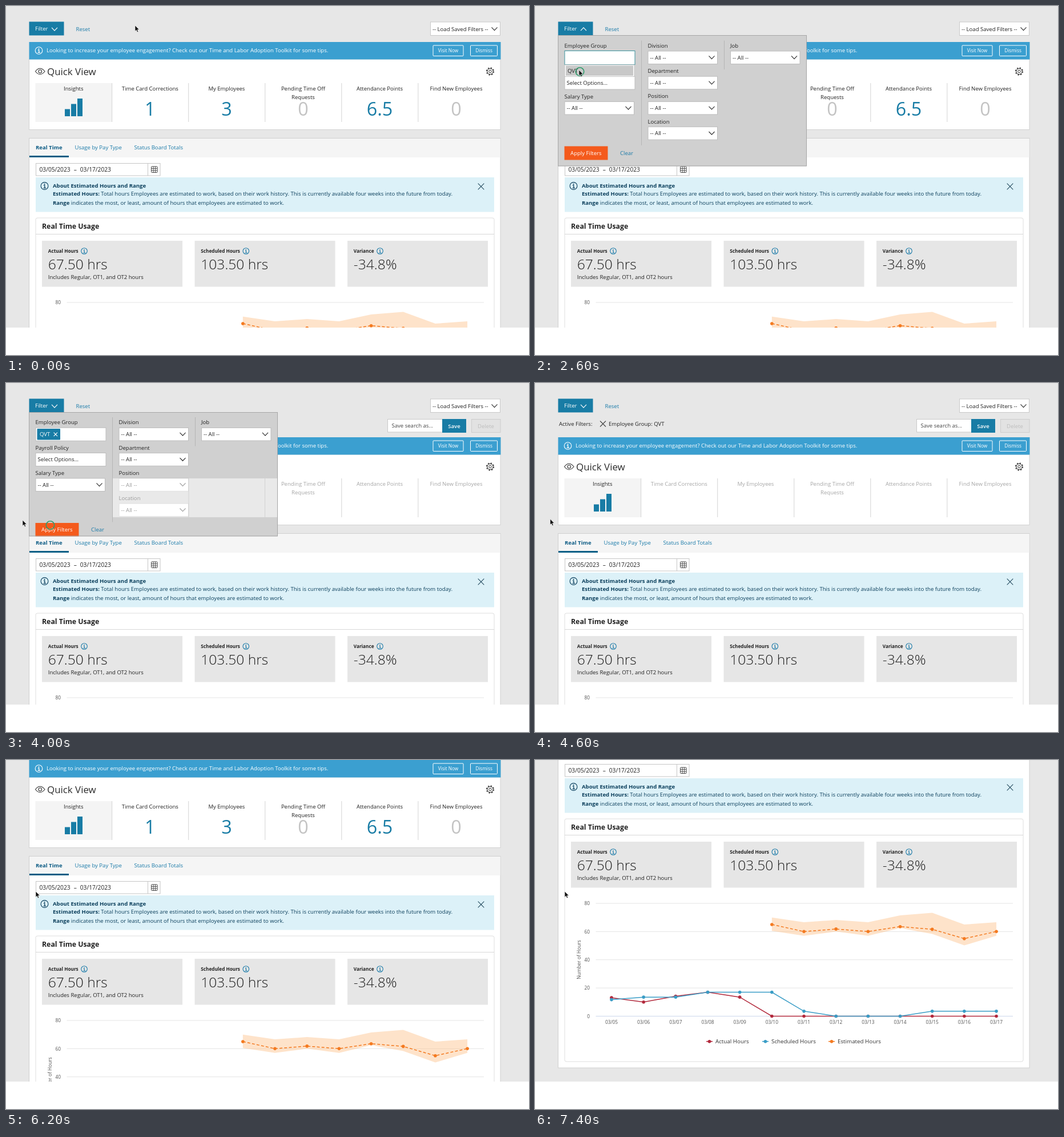
An HTML page for the animation above (7600 ms loop, 916 px wide and 611 px high).

```html
<!DOCTYPE html>
<html lang="en">
<head>
<meta charset="utf-8">
<title>Time dashboard</title>
<style>
  html, body { margin: 0; width: 100%; height: 100%; overflow: hidden; background: #fff; }
  svg { display: block; width: 100%; height: 100%; font-family: "Open Sans", sans-serif; }
  text { white-space: pre; }
</style>
</head>
<body>
<svg id="stage" viewBox="0 0 916 611"></svg>
<script>
const LOOP = 7600, STEP = 200;
const BLUE = '#187ca5', SKY = '#3b9fd0', LINK = '#1b7ba9', NAVY = '#0b3f5c', INK = '#222';
const GROUP = 'QVT';
const MID = 'text-anchor="middle"', BOLD = 'font-weight="700"', LIGHT = 'font-weight="300"';

// Drawing helpers
const rect = (x, y, w, h, fill, more = '') =>
  `<rect x="${x}" y="${y}" width="${w}" height="${h}" fill="${fill}" ${more}/>`;
const box = (x, y, w, h, fill, stroke, more = '') =>
  rect(x, y, w, h, fill, `stroke="${stroke}" ${more}`);
const text = (x, y, s, fill = INK, size = 9.55, more = '') =>
  `<text x="${x}" y="${y}" fill="${fill}" font-size="${size}" ${more}>${s}</text>`;
const path = (d, stroke, width = 1, more = '') =>
  `<path d="${d}" fill="none" stroke="${stroke}" stroke-width="${width}" ${more}/>`;
const circle = (x, y, r, fill, more = '') =>
  `<circle cx="${x}" cy="${y}" r="${r}" fill="${fill}" ${more}/>`;
const group = (body, more) => `<g ${more}>${body}</g>`;
const chevron = (x, y, color, up) => {
  const d = up ? -2.6 : 2.6;
  return path(`M${x - 5} ${y - d}l5 ${2 * d}l5 ${-2 * d}`, color, 1.2);
};
const cross = (x, y, r, color, width = 1.1) =>
  path(`M${x - r} ${y - r}l${2 * r} ${2 * r}m0 ${-2 * r}l${-2 * r} ${2 * r}`, color, width);
const info = (x, y, r, color) =>
  circle(x, y, r, 'none', `stroke="${color}" stroke-width="1.1"`) +
  circle(x, y - r * .45, r * .16, color) +
  path(`M${x - r * .25} ${y - r * .1}h${r * .3}v${r * .65}m${-r * .35} 0h${r * .7}`, color, r * .2);

// Motion helpers
const track = (keys, t, ease = u => u) => {
  const i = keys.findIndex(k => k[0] > t);
  if (i < 0) return keys.at(-1).slice(1);
  if (i === 0) return keys[0].slice(1);
  const a = keys[i - 1], b = keys[i], u = ease((t - a[0]) / (b[0] - a[0]));
  return a.slice(1).map((v, j) => v + (b[j + 1] - v) * u);
};
const swing = u => .5 - Math.cos(Math.PI * Math.min(1, Math.max(0, u))) / 2;

const POINTER = [[200, 226, 34], [800, 85, 42], [1400, 85, 42], [1800, 82, 86], [2000, 82, 86],
  [2400, 77, 112], [2700, 77, 112], [3400, 77, 246], [3800, 77, 246], [4000, 29, 240],
  [4200, 26, 238], [5000, 27, 238], [5600, 52, 230]];
const SCROLL = [[5800, 0], [6000, 18], [6200, 95], [6400, 180], [6600, 248], [6800, 278],
  [7000, 291], [7200, 298], [7400, 300]];
const CLICKS = [[1000, 1000, 85, 44], [2000, 2000, 83, 89], [2600, 2600, 78.5, 115], [3800, 4000, 77.5, 249]];

function header(t, open, applied) {
  const hover = t >= 800 && t < 1600;
  let s = rect(40.5, 27.5, 61, 24, hover ? SKY : BLUE) + text(51, 43.3, 'Filter', '#fff') +
    chevron(85, 40.5, '#fff', open) + text(122.5, 44.3, 'Reset', LINK) +
    box(743.5, 28, 122, 23.5, '#fff', '#c9c9c9') +
    text(747, 43.8, '-- Load Saved Filters --') + chevron(855.5, 40, '#333');
  if (applied) {
    s += text(42, 75.3, 'Active Filters:') + cross(119, 71.5, 5, '#444') +
      text(129, 75.3, 'Employee Group: ' + GROUP) +
      box(668.5, 63.5, 96, 22.5, '#fff', '#c9c9c9') + text(675.5, 78.3, 'Save search as...', '#444') +
      rect(764, 63, 42, 24, BLUE) + text(785, 78.5, 'Save', '#fff', 9.55, MID + ' font-weight="600"') +
      box(815.5, 63.5, 50.5, 23, '#e2e2e2', '#cdcdcd') + text(840.5, 78.5, 'Delete', '#bdbdbd', 9.55, MID);
  }
  return s;
}

function quickView(loading) {
  const tiles = [['Insights'], ['Time Card Corrections', '1'], ['My Employees', '3'],
    ['Pending Time Off', '0', 'Requests'], ['Attendance Points', '6.5'], ['Find New Employees', '0']];
  let s = box(40.5, 93, 825.5, 123.5, '#fff', '#d2d2d2') + rect(40.5, 63, 826, 30.5, SKY) +
    info(57.5, 78, 6.3, '#fff') +
    text(71, 81.3, 'Looking to increase your employee engagement? Check out our Time and Labor Adoption Toolkit for some tips.', '#fff') +
    box(748, 69, 53, 18.5, 'none', '#fff', 'rx="1"') + text(774.5, 81, 'Visit Now', '#fff', 8.25, MID) +
    box(813.5, 69, 47, 18.5, 'none', '#fff', 'rx="1"') + text(837, 81, 'Dismiss', '#fff', 8.25, MID);
  s += path('M51.5 114.5q8-10.5 16.5 0q-8.5 10.5-16.5 0z', '#333', 1.1) +
    circle(59.8, 114.5, 2.8, 'none', 'stroke="#333" stroke-width="1.1"') +
    text(72, 120.6, 'Quick View', '#2c2c2c', 16.9) +
    circle(848, 114.5, 6.2, 'none', 'stroke="#333" stroke-width="1.7" stroke-dasharray="2.43"') +
    circle(848, 114.5, 5, '#fff', 'stroke="#333"') + circle(848, 114.5, 2.2, '#fff', 'stroke="#333"') +
    rect(51.5, 135, 134.5, 68, '#f4f4f4');
  tiles.forEach(([label, value, second], i) => {
    const x = 118.3 + 134.05 * i;
    let names = text(x, 147.6, label, INK, 9.55, MID);
    if (second) names += text(x, 163, second, INK, 9.55, MID);
    s += group(names, loading && i ? 'opacity=".4"' : '');
    if (i) s += path(`M${x - 66.7} 135v68`, '#d4d4d4');
    if (value && !loading) s += text(x, 192.2, value, value === '0' ? '#c3c3c3' : BLUE, 32.3, MID);
  });
  return s + [[103, 12.5], [114, 21.5], [125, 31]].map(([x, h]) => rect(x, 193 - h, 9, h, BLUE)).join('');
}

function chart() {
  const px = i => 134 + 56.17 * i, py = v => 716.5 - 2.469 * v;
  const points = (values, from = 0) => values.map((v, i) => [px(i + from), py(v)]);
  const series = (values, color, from = 0, dash = '') => {
    const p = points(values, from);
    return path('M' + p.join('L'), color, 1.5, dash) + p.map(([x, y]) => circle(x, y, 2.8, color)).join('');
  };
  const RED = '#b2293c', CYAN = '#3a9dc6', ORANGE = '#f47a20', DASH = 'stroke-dasharray="5 3.2"';
  let s = '';
  for (let v = 0; v <= 80; v += 20)
    s += path(`M106.5 ${py(v)}H837`, v ? '#e4e4e4' : '#ccd6eb') +
      text(96, py(v) + 3.2, v, '#555', 8.3, 'text-anchor="end"');
  for (let i = 0; i < 13; i++)
    s += text(px(i), 729.6, '03/' + String(i + 5).padStart(2, '0'), '#555', 8.4, MID);
  s += text(0, 0, 'Number of Hours', '#555', 8.4, MID + ' transform="translate(79.5 617.5) rotate(-90)"');
  const high = points([70, 66.6, 68.2, 66.6, 71.5, 73.3, 65, 66.6], 5);
  const low = points([60.5, 57, 60, 57, 62.5, 58.3, 50.2, 57], 5).reverse();
  s += `<path d="M${[...high, ...low].join('L')}z" fill="#fdc08a" fill-opacity=".45"/>` +
    series([13.1, 10, 14.2, 17, 13.5, 0, 0, 0, 0, 0, 0, 0, 0], RED) +
    series([11.7, 13.5, 13.5, 17, 17, 17, 3.5, 0, 0, 0, 3.5, 3.5, 3.5], CYAN) +
    series([65, 60, 61.8, 60, 63.5, 61.6, 55, 60], ORANGE, 5, DASH);
  [[300, RED, 'Actual Hours'], [398, CYAN, 'Scheduled Hours'], [514, ORANGE, 'Estimated Hours']]
    .forEach(([x, color, label]) => s += path(`M${x} 760.7h11`, color, 1.5) +
      circle(x + 5.5, 760.7, 2.8, color) + text(x + 16, 763.8, label, '#333', 9.8, 'font-weight="500"'));
  return s;
}

function realTime() {
  let s = box(40.5, 231.5, 825.5, 575.5, '#fff', '#d0d0d0') + rect(41, 232, 824.5, 33, '#f5f5f5') +
    rect(41, 262, 69, 3, '#0b5f86') + text(52, 251.4, 'Real Time', '#0d5c85', 9.55, BOLD) +
    text(120.5, 251.4, 'Usage by Pay Type', LINK) + text(224.5, 251.4, 'Status Board Totals', LINK) +
    box(52.5, 275.5, 217.5, 21.5, '#fff', '#c6c6c6') + path('M248.5 275.5v21.5', '#c6c6c6') +
    text(58.5, 289.8, '03/05/2023', INK, 10.2) + text(118.7, 289.8, '–', INK, 10.2) +
    text(129.8, 289.8, '03/17/2023', INK, 10.2) +
    box(254.5, 281, 10.5, 10.5, '#fff', '#444', 'rx="1"') +
    path('M258 281v10.5m3.5 0v-10.5M254.5 284.5h10.5m0 3.5h-10.5', '#444', .9);
  const strong = label => `<tspan font-weight="700">${label}</tspan>`;
  s += rect(52, 300, 803, 60.5, '#dcf1f8') + info(67.5, 315, 6.4, NAVY) +
    text(82, 318.2, strong('About Estimated Hours and Range'), NAVY) +
    text(82, 332.4, strong('Estimated Hours:') + ' Total hours Employees are estimated to work, based on their work history. This is currently available four weeks into the future from today.', NAVY) +
    text(82, 347.6, strong('Range') + ' indicates the most, or least, amount of hours that employees are estimated to work.', NAVY) +
    cross(832, 316, 5.3, '#234a5f');
  s += box(52, 371, 803, 425, '#fff', '#dedede', 'rx="3"') + path('M52 399.5h803', '#d8d8d8') +
    text(63, 389.6, 'Real Time Usage', INK, 12.3, BOLD);
  [[63, 'Actual Hours', '67.50 hrs', 137], [330.5, 'Scheduled Hours', '103.50 hrs', 420.3], [598, 'Variance', '-34.8%', 655]]
    .forEach(([x, label, value, icon]) => s += rect(x, 411, 246, 80.5, '#e6e6e6') +
      text(x + 10.8, 431.6, label, INK, 8.2, BOLD) + info(icon, 429, 5.3, LINK) +
      text(x + 10.8, 460.7, value, INK, 24.6, LIGHT));
  return s + text(73.8, 478.1, 'Includes Regular, OT1, and OT2 hours') + chart();
}

function filterPanel(t, share, loading) {
  const height = 229 * share;
  const label = (x, y, s) => text(x, y + 3.4, s);
  const field = (x, y, s) => box(x, y, 123, 23, '#fff', '#bdbdbd') + text(x + 3.5, y + 15, s);
  const select = (x, y) => box(x, y, 121.5, 22.5, '#fff', '#bdbdbd') + text(x + 3.5, y + 14.8, '-- All --') +
    chevron(x + 111.5, y + 11, '#333');
  let s = path('M186.5 60.5V244M331.5 60.5V111', '#b5b5b5') +
    label(51.5, 69.6, 'Employee Group') + label(51.5, 114, 'Payroll Policy') + label(51.5, 158.3, 'Salary Type') +
    field(52, 123, 'Select Options...') + select(52, 167.5) + label(342, 69.6, 'Job') + select(342.5, 79);
  ['Division', 'Department', 'Position', 'Location'].forEach((name, i) =>
    s += label(197.5, 69.6 + 44.2 * i, name) + select(198, 79 + 44.2 * i));
  if (t < 2000) s += field(52, 78.8, 'Select Options...');
  else if (t <= 2600)
    s += box(52, 78.5, 123, 24, '#fff', '#3a929d') + box(52, 103, 122, 20.5, '#fff', '#c4c4c4') +
      rect(54, 104.5, 118, 17.5, '#c8c8c8') + text(57, 116.7, GROUP);
  else
    s += field(52, 78.8, '') + rect(54.5, 80.5, 40.5, 19.5, BLUE, 'rx="1"') +
      text(59, 93.8, GROUP, '#fff') + cross(86.8, 90.4, 3.2, '#fff');
  s += rect(51.5, 245.5, 76, 24, '#f45a1c') + text(89.3, 261, 'Apply Filters', '#fff', 9.55, MID) +
    text(149, 261, 'Clear', LINK);
  const veil = loading ? group(rect(187, 167, 289, 68, '#fff') + path('M320 167v68M453.5 167v68', '#d4d4d4'), 'opacity=".55"') : '';
  return `<clipPath id="panel">${rect(40, 51, 436, height + .5, '#000')}</clipPath>` +
    rect(40.5, 51.5, 435, height, '#d0d0d0') +
    group(group(s, `transform="translate(0 ${-10 * (1 - share)})"`) + veil, 'clip-path="url(#panel)"') +
    box(40.5, 51.5, 435, height - .5, 'none', '#a6a6a6');
}

function pointer(t) {
  const [x, y] = track(POINTER, t, swing);
  const hand = (t >= 800 && t < 1600) || (t >= 3400 && t < 4000);
  const shape = hand
    ? '<path d="M0-1c1.2 0 1.5.8 1.5 1.5v3l3.6.9c1 .3 1.3 1 1.2 2l-.8 4.2h-5.6l-3-4c-.6-1 .7-1.8 1.5-1l.1.3V.5c0-1 .5-1.5 1.5-1.5z" fill="#fff" stroke="#111" stroke-width=".9"/>'
    : '<path d="M0 0v10.2l2.3-2.1 1.6 3.7 1.8-.8-1.6-3.5h3.2z" fill="#111" stroke="#fff" stroke-width=".6"/>';
  const rings = CLICKS.filter(([from, to]) => t >= from && t <= to)
    .map(([, , cx, cy]) => circle(cx, cy, 7.2, 'none', 'stroke="#2f9c6c" stroke-width="1.6"')).join('');
  return rings + group(shape, `transform="translate(${x} ${y})"`);
}

function render(t) {
  const open = t >= 1000 && t < 4000, applied = t >= 4000, loading = applied && t < 4800;
  const share = swing((t - 932) / 400) - swing((t - 3941) / 400);
  const [scroll] = track(SCROLL, t);
  const page = header(t, open, applied) +
    group(quickView(loading) + realTime(), `transform="translate(0 ${applied ? 32 : 0})"`) +
    (share > .001 ? filterPanel(t, share, loading) : '');
  const status = t >= 1000 && t < 1800
    ? '<path d="M0 549h99q3 0 3 3v11H0z" fill="#c6c6c6" stroke="#b0b0b0" stroke-width=".6"/>' +
      text(96, 559.2, '/dayshed/v3/organizer/#', INK, 8.3, 'text-anchor="end" font-family="Inter, sans-serif"')
    : '';
  return rect(0, 0, 916, 563, '#e7e7e7') + group(page, `transform="translate(0 ${-scroll})"`) +
    rect(0, 563, 916, 48, '#fff') + status + pointer(t);
}

const stage = document.getElementById('stage');
let shown = -1;
function tick() {
  const t = Math.floor(performance.now() % LOOP / STEP) * STEP;
  if (t !== shown) stage.innerHTML = render(shown = t);
  requestAnimationFrame(tick);
}
tick();
</script>
</body>
</html>
```
